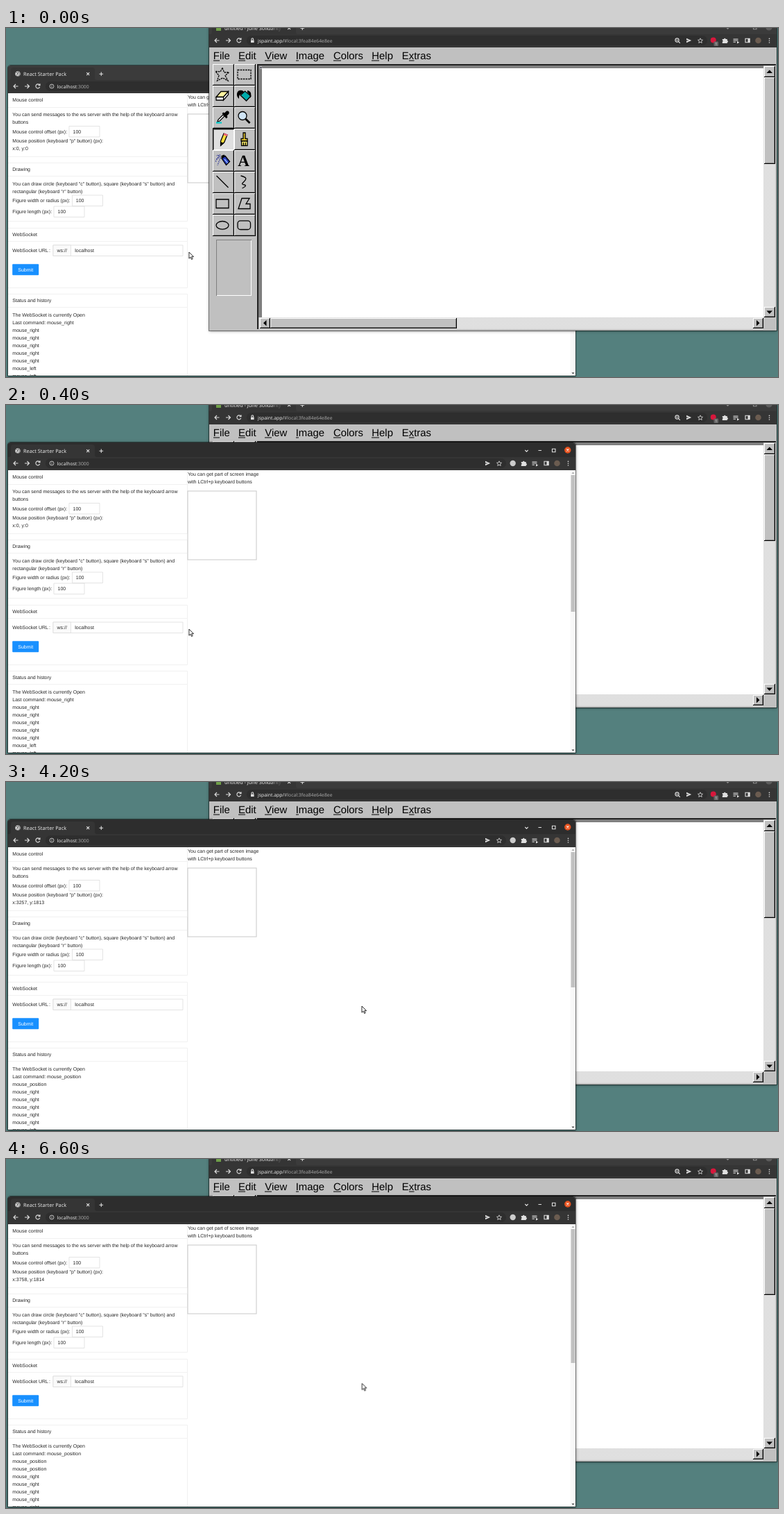
An HTML page that plays this animation: 1113 by 503 pixels, repeating every 8000 ms.

```html
<!DOCTYPE html>
<html lang="en">
<head>
<meta charset="utf-8">
<title>Mouse control</title>
<style>
html, body { margin: 0; width: 100%; height: 100%; overflow: hidden; background: #54807e; }
.layer, .layer > * { position: absolute; }
.layer, .layer > svg { left: 0; top: 0; width: 1113px; height: 503px; }
svg { text-rendering: geometricPrecision; }
text { white-space: pre; }

.frame { left: 2.5px; width: 818.5px; background: #353535; }
#paint .frame { left: 292.5px; top: -20px; height: 455.5px; box-shadow: 0 0 0 1px rgba(0,0,0,.45), 0 1px 4px rgba(0,0,0,.45); background: #c0c0c0; }
#web .frame { top: 54px; height: 447px; border-radius: 4px 4px 0 0; background: #fff; animation: shadow 8s step-end infinite; }

.up { background: #c0c0c0; box-shadow: inset -1px -1px #000, inset 1px 1px #fff, inset -2px -2px #808080; }
.hatch, .tool.on { background: repeating-conic-gradient(#fff 0 25%, #c0c0c0 0 50%) 0 0 / 2px 2px; }
.tool { width: 31px; height: 31px; }
.tool.on { box-shadow: inset 1px 1px #000, inset -1px -1px #fff, inset 2px 2px #808080; }

.ui { font: 7.3px "Noto Sans", "Open Sans", sans-serif; fill: #e6e6e6; }
.url { font-size: 6.8px; }
.menu { font: 14.9px "Liberation Sans", Arial, sans-serif; }
.page { font: 7px "Liberation Sans", Arial, sans-serif; fill: #262626; }
.card { fill: none; stroke: #f1f1f1; }
.input { fill: #fff; stroke: #d9d9d9; stroke-width: .7; }
.line { fill: none; stroke: #e0e0e0; stroke-width: 1.1; }
.ink { fill: none; stroke: #000; stroke-width: 1.3; }

#paint { animation: lower 8s step-end infinite; }
#web { z-index: 1; }
#pointer { z-index: 5; }
#strip { animation: strip 8s step-end infinite; }
#buttons { animation: dim 8s step-end infinite; }
#close { animation: close 8s step-end infinite; }
#thumb { animation: thumb 8s step-end infinite; }
#log { animation: log 8s step-end infinite; }
#arrow { animation: move 8s step-end infinite; }
.first { animation: first 8s step-end infinite; }
.second { animation: second 8s step-end infinite; }
.third { animation: third 8s step-end infinite; }

@keyframes lower { 0% { z-index: 2; } 2.5%, 100% { z-index: 0; } }
@keyframes shadow {
  0% { box-shadow: 0 0 0 1px rgba(0,0,0,.45), 0 1px 3px rgba(0,0,0,.35); }
  5%, 100% { box-shadow: 0 0 0 1px rgba(0,0,0,.45), 0 1px 5px rgba(0,0,0,.5); }
}
@keyframes strip { 0% { fill: #3b3b3b; } 5%, 100% { fill: #2d2d2d; } }
@keyframes dim { 0% { opacity: .5; } 5%, 100% { opacity: 1; } }
@keyframes close { 0% { fill: #5c5c5c; } 5%, 100% { fill: #e95420; } }
@keyframes thumb { 0% { height: 197px; } 38.75% { height: 195px; } 82.5%, 100% { height: 193px; } }
@keyframes log {
  0% { transform: translateY(-22px); }
  38.75% { transform: translateY(-11px); }
  82.5%, 100% { transform: none; }
}
@keyframes first { 0% { visibility: visible; } 38.75%, 100% { visibility: hidden; } }
@keyframes second { 0% { visibility: hidden; } 38.75% { visibility: visible; } 82.5%, 100% { visibility: hidden; } }
@keyframes third { 0% { visibility: hidden; } 82.5%, 100% { visibility: visible; } }
@keyframes move {
  0% { transform: translate(263.8px, 323px); }
  48.75% { transform: translate(291.2px, 323.4px); }
  50% { transform: translate(376px, 321px); }
  51.25% { transform: translate(466px, 320px); }
  52.5% { transform: translate(513px, 323px); }
  60%, 100% { transform: translate(513.3px, 323.4px); }
}
</style>
</head>
<body>

<div class="layer" id="paint">
  <div class="frame"></div>
  <div style="left:362px;top:52px;width:748px;height:382px;background:#c0c0c0;box-shadow:inset 2px 2px #222"></div>
  <div style="left:364px;top:54px;width:728px;height:363px;background:#808080"></div>
  <div style="left:369px;top:58px;width:723px;height:359px;background:#fff"></div>
  <div class="hatch" style="left:1092px;top:55px;width:17px;height:362px"></div>
  <div class="hatch" style="left:365px;top:417px;width:727px;height:17px"></div>
  <div class="up" style="left:1093px;top:55px;width:16px;height:16px"></div>
  <div class="up" style="left:1093px;top:71px;width:16px;height:125px"></div>
  <div class="up" style="left:1093px;top:402px;width:16px;height:15px"></div>
  <div class="up" style="left:366px;top:418px;width:15px;height:15px"></div>
  <div class="up" style="left:381px;top:418px;width:269px;height:15px"></div>
  <div class="up" style="left:1077px;top:418px;width:15px;height:15px"></div>
  <div style="left:303px;top:305px;width:51px;height:81px;box-shadow:inset 1px 1px #808080,inset -1px -1px #fff"></div>
  <svg>
    <rect x="292.5" y="-12" width="818.5" height="21" fill="#3b3b3b"/>
    <use href="#bar" x="290" y="-66"/>
    <use href="#controls" x="290" y="-66" opacity=".5"/>
    <circle cx="1100" cy="-1" r="4.6" fill="#5c5c5c"/>
    <rect x="303" y="-3" width="7" height="7" fill="#6f9f48"/>
    <linearGradient id="fade" gradientUnits="userSpaceOnUse" x1="380" x2="399">
      <stop stop-color="#e6e6e6"/><stop offset="1" stop-color="#e6e6e6" stop-opacity="0"/>
    </linearGradient>
    <g class="ui">
      <text x="315" y="3" fill="url(#fade)">untitled - June Solidarity</text>
      <text class="url" x="363" y="20.6">jspaint.app/<tspan fill="#a5a5a5">#local:3fea84e64e8ee</tspan></text>
    </g>
    <path d="M353 17.5h4.6v3.6H353z" fill="#ddd"/>
    <path class="line" d="M354 17.5v-1.4a1.3 1.3 0 012.6 0v1.4"/>
    <g class="line"><circle cx="967.5" cy="17.5" r="2.6"/><path d="M969.5 19.5l2.3 2.3M966.2 17.5h2.6"/></g>
    <circle cx="1019.7" cy="17.5" r="4" fill="#d8173c"/>
    <rect x="1020.5" y="19.5" width="6.5" height="6.5" rx="1" fill="#666"/>
    <text class="ui" x="1022.2" y="25" style="font-size:5.5px">1</text>

    <g class="menu">
      <text x="298.8" y="45">File</text><text x="335" y="45">Edit</text><text x="373.3" y="45">View</text>
      <text x="417.7" y="45">Image</text><text x="472" y="45">Colors</text><text x="527.3" y="45">Help</text>
      <text x="570.8" y="45">Extras</text>
    </g>
    <path class="ink" style="stroke-width:1" d="M299 47h9M335 47h10M373 47h10M418 47h4M472 47h11M527 47h11M581 47h7.5"/>
    <path d="M1096.500 65h8.500l-4.250-4.500zM1096.500 407.500h8.500l-4.250 4.500zM375.500 421v8.500l-4.500-4.250zM1082 421v8.500l4.500-4.250z"/>
    <path d="M366 55.500h3v3h-3z" fill="#fff"/><path d="M366.500 56h2v2h-2z" fill="#223"/>
  </svg>
  <svg id="icons">
    <path class="ink" stroke-dasharray="2.500 1" d="M312 57.500l2.500 6.500h7l-5.500 4.500 4 7.500-7.500-4-8 4 2.500-7.500-5-6 7 .5z"/>
    <path class="ink" stroke-dasharray="2.500 1.200" d="M334 60.500h19v13h-19z"/>
    <path class="ink" style="fill:#fff3a0" d="M303 99.500l7-8h10.500l-7 8z"/>
    <path class="ink" style="fill:#fff" d="M303 99.500v4.500h10.500v-4.500zM313.500 104l7-8v-4.500l-7 8z"/>
    <path class="ink" style="fill:#0aa" d="M338 97l6.500-6 8.500 7-6.500 7z"/>
    <path d="M334 92c2-3 7-3 9 0l-5 4c-2 0-2 3-2 6-3-2-4-7-2-10zM348 90c6 1 6 6 4.500 11-1-4-2-7-4.500-8z"/>
    <path class="ink" style="fill:#fff" d="M305 135l1-3 7-7 2 2-7 7z"/>
    <path d="M311.500 123l2-1.500 1.500 1 2.500-2.500c3-1.500 5 1 4 3.500l-3 3 1 2-2 2z"/>
    <path d="M303 136.500h8" stroke="#0cc" stroke-width="2.200"/>
    <circle class="ink" cx="341" cy="126.500" r="6" style="fill:#cfe4f5"/>
    <path d="M345.500 131l6 6" stroke="#000" stroke-width="2.800"/>
    <path class="ink" style="fill:#ffdf3c" d="M309.500 163l4.500-11 5 2-4.500 11-5 4.500z"/>
    <path d="M309.500 164l4.500 2-4.500 4z"/><path d="M313.500 154l5 2 1.200-2.500-5-2z" fill="#e67"/>
    <path class="ink" style="fill:#e4c52e" d="M342 151h3v8.500h3v3.500h-9v-3.500h3z"/>
    <path class="ink" style="fill:#fff06a" d="M339.500 163h8.500v6.500h-8.500zM342.300 165v4.500M345.200 165v4.500"/>
    <path class="ink" style="fill:#2638b8" d="M311 188l5-3.500 6.500 8-5 5z"/>
    <path d="M310.500 188v-4l4-1.500 1.500 2.500z"/><path d="M315 189l4.500 5.500" stroke="#9ac4ff" stroke-width="1.300"/>
    <path d="M309 183l-6 1M309 185l-7 5M309 187l-4 11M307 184l-5 9" stroke="#1c2490" stroke-width="1.300" stroke-dasharray="1.300 1.500"/>
    <text x="342.500" y="198.500" text-anchor="middle" style="font:bold 23px 'Liberation Serif',serif">A</text>
    <path class="ink" d="M303.500 213l17 17M338.500 213c8 2 9 4 5 8s-4 4 0 5 1 3-3 5M303 247h18v12.500h-18zM340 245.500h11l-5 8h6v7h-17z"/>
    <ellipse class="ink" cx="312" cy="284.300" rx="9" ry="5.800"/>
    <rect class="ink" x="334" y="277.800" width="18.500" height="12.700" rx="4"/>
  </svg>
</div>

<div class="layer" id="web">
  <div class="frame"></div>
  <svg>
    <defs>
      <g id="bar">
        <path d="M4 75q3 0 3-3V61q0-4 4-4h113q4 0 4 4v11q0 3 3 3zM2.500 75h818.500v19h-818.500z" fill="#353535"/>
        <rect x="57" y="77" width="664" height="14" rx="7" fill="#2e2e2e"/>
        <g class="line">
          <path d="M116.200 64.200l4 4m0-4l-4 4M134.500 66.200h5.600m-2.800-2.800v5.600"/>
          <path d="M17.500 84h-6.500m3-3l-3 3 3 3M27 84h6.500m-3-3l3 3-3 3"/>
          <path d="M48.300 82a3 3 0 10.400 3M49 80.200v2.500h-2.500"/>
          <path d="M711 80.800l1 2.300 2.500.2-1.900 1.700.6 2.500-2.200-1.300-2.200 1.300.6-2.500-1.900-1.700 2.500-.2z" stroke-width=".8"/>
          <path d="M758.500 82h7m-7 2h7m-7 2.200h3.500"/>
          <path d="M776 81.200h6v5.600h-6z"/>
        </g>
        <g fill="#e0e0e0">
          <path d="M691 80.800l7.200 3.200-7.200 3.200v-2.500l4-.7-4-.7zM779.500 81h3v6h-3zM764 85l3.300 1.700-3.300 1.700z"/>
          <path d="M742.800 82h2.300a1.200 1.200 0 012.400 0h2.300v2.200a1.200 1.200 0 010 2.400v1.400h-7v-2.200a1.200 1.200 0 000-2.300z"/>
          <circle cx="810.500" cy="81.400" r=".8"/><circle cx="810.500" cy="84.200" r=".8"/><circle cx="810.500" cy="87" r=".8"/>
        </g>
        <circle cx="794.500" cy="84" r="4.300" fill="#6b5c50"/>
      </g>
      <g id="controls" class="line">
        <path d="M748.300 65l2.200 2.200 2.200-2.200M767.500 65.500h4.500M787.500 63.200h4.500v4.500h-4.500z"/>
      </g>
    </defs>
    <path id="strip" d="M2.500 75V58q0-4 4-4h810.500q4 0 4 4v17z"/>
    <use href="#bar"/>
    <g id="buttons"><use href="#controls"/></g>
    <circle id="close" cx="809.800" cy="65" r="4.700"/>
    <path class="line" style="stroke:#fff" d="M808.200 63.400l3.200 3.200m0-3.200l-3.200 3.200"/>
    <circle cx="17" cy="66" r="3.600" fill="#e8e8e8"/>
    <path d="M14.500 64.200l2 .5 .5 1.500-1.500 1 .5 1.500M17.500 63.200l.5 1.500 2 .5M18 67l1.500.5-1 1.200" fill="none" stroke="#444"/>
    <g class="ui">
      <text x="25" y="68.600">React Starter Pack</text>
      <text class="url" x="73.500" y="86.600">localhost<tspan fill="#a5a5a5">:3000</tspan></text>
    </g>
    <circle class="line" cx="66" cy="84" r="3" style="stroke-width:.8"/><path class="line" d="M66 83.600v2M66 82v.8" style="stroke-width:.8"/>
    <circle cx="730.700" cy="84" r="4.200" fill="#ccc"/>

    <path class="card" d="M3 114.500h258.500V94M261.500 114v71.500H3M3 194.500h258.500v84H3M3 213.500h258.500M3 288.500h258.500v86H3M3 307.500h258.500M3 383.500h258.500v117.500M3 402.500h258.500"/>
    <path class="input" d="M91 141.500h44V157H91zM95.500 241h44v15.500h-44zM69 257h44v15.500H69zM68 313h187v15.500H68z"/>
    <path class="input" style="fill:#fafafa" d="M68 313h25.500v15.500H68z"/>
    <rect x="9.200" y="340.200" width="38" height="16" rx="1" fill="#1890ff"/>
    <rect x="262" y="124" width="99" height="99" fill="none" stroke="#c8c8c8"/>

    <rect x="813.500" y="94" width="7.500" height="407" fill="#f8f8f8"/>
    <rect id="thumb" x="814.500" y="101" width="6" height="197" fill="#c1c1c1"/>
    <path d="M815.500 99h4l-2-2.500z" fill="#aaa"/><path d="M815.500 496.500h4l-2 2.500z" fill="#505050"/>

    <g class="page">
      <text x="9.300" y="106.400">Mouse control</text>
      <text x="9.300" y="127.400">You can send messages to the ws server with the help of the keyboard arrow</text>
      <text x="9.300" y="138.400">buttons</text>
      <text x="9.300" y="151.600">Mouse control offset (px):</text><text x="96.500" y="151.600">100</text>
      <text x="9.300" y="165">Mouse position (keyboard "p" button) (px):</text>
      <text class="first" x="9.300" y="176">x:0, y:0</text>
      <text class="second" x="9.300" y="176">x:3257, y:1813</text>
      <text class="third" x="9.300" y="176">x:3758, y:1814</text>
      <text x="9.300" y="205.900">Drawing</text>
      <text x="9.300" y="227">You can draw circle (keyboard "c" button), square (keyboard "s" button) and</text>
      <text x="9.300" y="238">rectangular (keyboard "r" button)</text>
      <text x="9.300" y="251.200">Figure width or radius (px):</text><text x="100.800" y="251.200">100</text>
      <text x="9.300" y="267.200">Figure length (px):</text><text x="74.500" y="267.200">100</text>
      <text x="9.300" y="299.500">WebSocket</text>
      <text x="9.300" y="323.200">WebSocket URL<tspan dx="1">:</tspan></text><text x="73.500" y="323.200">ws://</text><text x="99.300" y="323.200">localhost</text>
      <text x="17.300" y="350.800" fill="#fff">Submit</text>
      <text x="9.300" y="395">Status and history</text>
      <text x="9.300" y="416">The WebSocket is currently Open</text>
      <text x="9.300" y="427">Last command: <tspan class="first">mouse_right</tspan></text>
      <text x="9.300" y="427" visibility="hidden">Last command: <tspan class="second">mouse_position</tspan></text>
      <text x="9.300" y="427" visibility="hidden">Last command: <tspan class="third">mouse_position</tspan></text>
      <text x="262" y="102.200">You can get part of screen image</text>
      <text x="262" y="113.200">with LCtrl+p keyboard buttons</text>
      <svg x="0" y="430" width="260" height="71"><g id="log"></g></svg>
    </g>
  </svg>
</div>

<div class="layer" id="pointer">
  <svg><path id="arrow" d="M0 0v9.200l2.200-1.900 1.500 3.300 1.500-.7-1.500-3.200h3z" fill="#fff" stroke="#111" stroke-width=".9"/></svg>
</div>

<script>
const paint = document.getElementById('paint');
const icons = document.getElementById('icons');
for (let i = 0; i < 16; i++) {
  const tool = document.createElement('div');
  tool.className = i === 6 ? 'tool on' : 'tool up';
  tool.style.left = 298 + i % 2 * 31 + 'px';
  tool.style.top = 52 + (i >> 1) * 31 + 'px';
  paint.insertBefore(tool, icons);
}

const log = document.getElementById('log');
['position', 'position', ...Array(5).fill('right'), 'left', 'left'].forEach((name, i) => {
  const row = document.createElementNS('http://www.w3.org/2000/svg', 'text');
  row.setAttribute('x', 9.3);
  row.setAttribute('y', 8 + i * 11);
  row.textContent = 'mouse_' + name;
  log.append(row);
});
</script>
</body>
</html>
```
